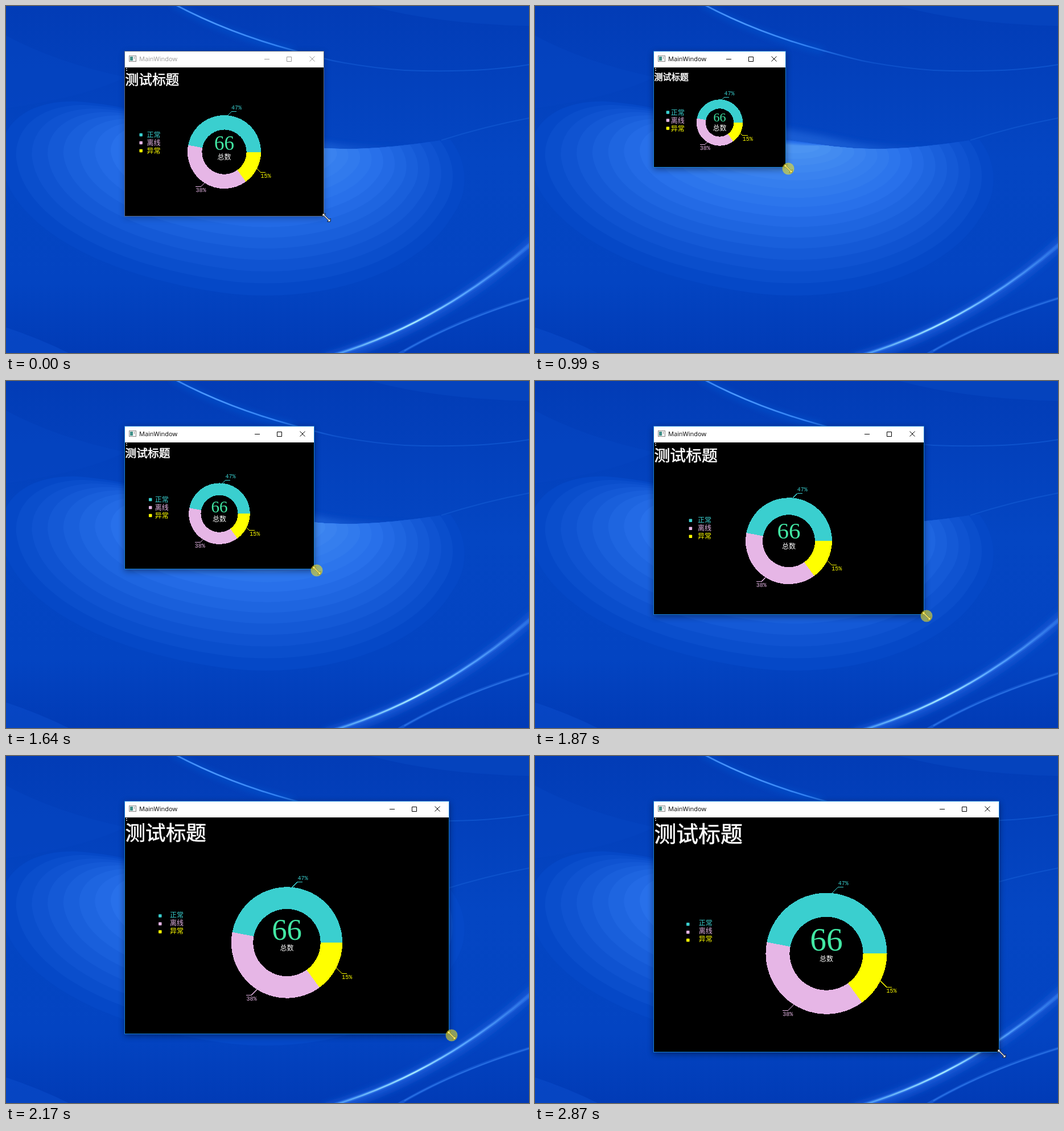
These frames come from a looping animation (919 px wide and 610 px high, 3.1 s). An HTML page:

```html
<!DOCTYPE html>
<html lang="zh">
<head>
<meta charset="utf-8">
<title>MainWindow</title>
<style>
html, body { margin: 0; width: 100%; height: 100%; overflow: hidden; background: #0341bb; }
svg { display: block; width: 100%; height: 100%; }
.caption { font: 11px "Open Sans", sans-serif; }
.label { font: 12px "Noto Sans CJK SC", "Noto Sans CJK", sans-serif; }
.percent { font: 10px "Liberation Mono", monospace; }
.total { font-family: "Liberation Serif", serif; }
.heading { font-family: "Noto Sans CJK SC", "Noto Sans CJK", sans-serif; }
.crisp { shape-rendering: crispEdges; }
</style>
</head>
<body>
<svg viewBox="0 0 919 610" preserveAspectRatio="none">
  <defs>
    <linearGradient id="base" x2="0" y2="1">
      <stop offset="0" stop-color="#023cb6"/>
      <stop offset=".45" stop-color="#0446c3"/>
      <stop offset=".8" stop-color="#0344c2"/>
      <stop offset="1" stop-color="#013bb6"/>
    </linearGradient>
    <linearGradient id="topRay" gradientUnits="userSpaceOnUse" x1="290" y1="0" x2="600" y2="0">
      <stop offset="0" stop-color="#347fee"/>
      <stop offset=".2" stop-color="#4c98ff"/>
      <stop offset=".6" stop-color="#3180f2"/>
      <stop offset="1" stop-color="#1257d2" stop-opacity="0"/>
    </linearGradient>
    <linearGradient id="lowRay" gradientUnits="userSpaceOnUse" x1="570" y1="0" x2="919" y2="0">
      <stop offset="0" stop-color="#3c8cf2"/>
      <stop offset=".42" stop-color="#a0e6ff"/>
      <stop offset=".65" stop-color="#5aa8ff"/>
      <stop offset="1" stop-color="#2a70e4"/>
    </linearGradient>
    <clipPath id="below">
      <path d="M-30 610V150H100C240 172 330 215 440 234S610 260 770 235H919V610Z"/>
    </clipPath>
    <filter id="soft" x="-20%" y="-30%" width="140%" height="160%"><feGaussianBlur stdDeviation="6"/></filter>
    <filter id="fine" x="-10%" y="-10%" width="120%" height="120%"><feGaussianBlur stdDeviation=".7"/></filter>
  </defs>

  <rect width="919" height="610" fill="url(#base)"/>
  <path d="M640 0Q760 32 919 35V0Z" fill="#0646c0" opacity=".7"/>
  <path d="M0 52Q90 100 210 125Q140 160 0 180Z" fill="#0545c1" opacity=".6"/>
  <path d="M0 565Q60 585 110 610H0Z" fill="#0a4cca" opacity=".6"/>
  <path d="M330 205Q440 212 540 236T750 245Q560 268 380 240Z" fill="#2a70e2" opacity=".55" filter="url(#soft)"/>
  <g id="glow" clip-path="url(#below)"></g>

  <g fill="none">
    <path d="M700 113Q830 118 919 103M765 236Q840 212 919 197" stroke="#0d52cc" stroke-width="2" filter="url(#fine)"/>
    <path d="M292 -4Q390 52 505 79" stroke="#1155d0" stroke-width="6" filter="url(#soft)"/>
    <path d="M505 78Q590 105 700 113" stroke="#0d50ca" stroke-width="2" filter="url(#fine)"/>
    <path d="M296 -3Q390 47 505 78T600 100" stroke="url(#topRay)" stroke-width="2.6" filter="url(#fine)"/>
    <path d="M560 622Q770 560 930 410" stroke="#1457d4" stroke-width="18" filter="url(#soft)"/>
    <path d="M575 614Q760 558 925 416" stroke="#2468e0" stroke-width="7" filter="url(#fine)"/>
    <path d="M575 614Q760 558 925 416" stroke="url(#lowRay)" stroke-width="3" filter="url(#fine)"/>
    <path d="M690 612Q790 552 925 512" stroke="#1254cf" stroke-width="5" filter="url(#fine)"/>
    <path d="M700 606Q795 552 925 512" stroke="#2c74e6" stroke-width="1.500" filter="url(#fine)"/>
  </g>

  <rect id="shadow" x="208" y="82" filter="url(#soft)"/>
  <rect id="body" x="208" y="79"/>
  <rect id="bar" x="209" y="80" height="28" fill="#fff"/>
  <rect id="edge" x="208.5" y="79.5" fill="none"/>
  <g>
    <rect x="216.500" y="87.500" width="12" height="10" fill="#f4f4f4" stroke="#8b8b8b"/>
    <rect x="218" y="89" width="5" height="7" fill="#3f8f88"/>
    <path d="M225.500 89v4" stroke="#999"/>
  </g>
  <text class="caption" id="caption" x="234" y="97">MainWindow</text>
  <path id="buttons" fill="none" d="M-104 93.500h9M-64.500 89.500h8v8h-8zM-24.500 88.500l9 9m0 -9l-9 9"/>
  <path d="M211 109h2v1.500h-2zM211 112.500h2v1.500h-2z" fill="#ddd"/>
  <text class="heading" id="heading" x="209.500" fill="#fff" stroke="#fff" stroke-width=".6">测试标题</text>
  <g id="chart"></g>
  <text class="total" id="total" text-anchor="middle" fill="#42e8a4">66</text>
  <text class="label" id="unit" text-anchor="middle" fill="#fff">总数</text>
  <g id="cursor">
    <path d="M-7-7L-1.500-7L-3.500-5L5 3.500L7 1.500V7H1.500L3.500 5L-5-3.500L-7-1.500Z" fill="#fff" stroke="#111"/>
    <circle id="press" r="10.500" fill="#ffeb14" opacity=".55"/>
  </g>
</svg>
<script>
const LOOP = 3100, ACTIVE = 760, RELEASE = 2870;
// Time in ms, right edge and bottom edge of the window while it is dragged.
const STEPS = [
  [0, 558, 369], [840, 525, 345], [920, 482, 313], [990, 440, 283],
  [1070, 424, 269], [1150, 414, 260], [1240, 408, 254], [1310, 407, 253],
  [1480, 436, 270], [1560, 488, 300], [1640, 541, 330], [1720, 594, 360],
  [1790, 641, 386], [1870, 683, 410], [1940, 720, 434], [2020, 741, 452],
  [2100, 761, 471], [2170, 778, 488], [2250, 791, 499], [2330, 801, 508],
  [2410, 808, 514], [2480, 811, 517], [2580, 815, 520]
];
const SLICES = [
  { name: '正常', share: 47, color: '#3acfcf', side: 1, up: -1 },
  { name: '离线', share: 38, color: '#e6b6e6', side: -1, up: 1 },
  { name: '异常', share: 15, color: '#ffff00', side: 1, up: 1 }
];

const $ = id => document.getElementById(id);

function set(el, attrs) {
  for (const key in attrs) el.setAttribute(key, attrs[key]);
  return el;
}

function add(parent, tag, attrs, text = '') {
  const el = document.createElementNS('http://www.w3.org/2000/svg', tag);
  el.textContent = text;
  return parent.appendChild(set(el, attrs));
}

function mix(a, b, k) {
  return `rgb(${a.map((v, i) => Math.round(v + (b[i] - v) * k))})`;
}

// Nested bands that flatten towards the bright middle.
function drawGlow() {
  const shape = 'M8 265C8 205 60 170 135 172C240 178 330 217 440 230S610 245 768 235' +
    'C800 275 800 325 770 365C715 455 560 508 400 492C210 470 20 390 8 265Z';
  const count = 16, cx = 460, cy = 246;
  const rim = [5, 72, 199], mid = [42, 115, 236], core = [76, 148, 242];
  for (let i = 0; i < count; i++) {
    const k = i / (count - 1), sx = 1.04 - k * 0.92, sy = sx ** 1.4;
    add($('glow'), 'path', {
      d: shape,
      fill: k < 0.5 ? mix(rim, mid, k / 0.5) : mix(mid, core, k * 2 - 1),
      transform: `translate(${cx * (1 - sx)} ${cy * (1 - sy)}) scale(${sx} ${sy})`
    });
  }
}

function buildChart() {
  for (const s of SLICES) {
    const fill = s.color;
    s.ring = add($('chart'), 'path', { fill, class: 'crisp' });
    s.lead = add($('chart'), 'path', { fill: 'none', stroke: fill, class: 'crisp' });
    s.percent = add($('chart'), 'text', { fill, class: 'percent' }, s.share + '%');
    s.mark = add($('chart'), 'rect', { fill, width: 5.5, height: 5.5, rx: 0.8 });
    s.label = add($('chart'), 'text', { fill, class: 'label' }, s.name);
  }
}

function drawChart(cx, cy, R) {
  const inner = R * 0.606;
  const at = (share, r) => {
    const a = share * Math.PI / 50;
    return [cx + r * Math.cos(a), cy - r * Math.sin(a)];
  };
  const legendY = cy - 1.5 - 0.547 * (R - 37);
  const legendX = cx - 2.1 * R;
  let from = 0;
  SLICES.forEach((s, i) => {
    const to = from + s.share;
    set(s.ring, {
      d: `M${at(from, R)}A${R} ${R} 0 0 0 ${at(to, R)}` +
         `L${at(to, inner)}A${inner} ${inner} 0 0 1 ${at(from, inner)}Z`
    });
    const [x, y] = at((from + to) / 2, R);
    const tilt = R * 0.1;
    const bx = x + s.side * tilt, by = y + s.up * tilt;
    set(s.lead, { d: `M${x} ${y}L${bx} ${by}h${s.side * 9}` });
    set(s.percent, { x: s.side > 0 ? bx : bx - 9, y: by + (s.up > 0 ? 9.5 : -3.5) });

    const row = legendY + (i - 1) * 14;
    set(s.mark, {
      x: legendX - 5 - 0.2086 * (R - 37) - 2.75,
      y: row - 3.5 + 0.04 * (R - 37)
    });
    set(s.label, { x: legendX - 0.5, y: row + 4.5 });
    from = to;
  });
  set($('total'), { x: cx, y: cy - 0.05 * R, 'font-size': 0.54 * R });
  set($('unit'), { x: cx, y: cy + 13.5 });
}

function render(t) {
  const [, right, bottom] = STEPS.findLast(s => s[0] <= t);
  const active = t >= ACTIVE;
  const width = right - 207, height = bottom - 78;
  const ink = active ? '#000' : '#999';

  set($('shadow'), { width, height, opacity: active ? 0.42 : 0.25 });
  set($('body'), { width, height });
  set($('bar'), { width: width - 2 });
  set($('edge'), { width: width - 1, height: height - 1, stroke: active ? '#1883d7' : '#5c6b80' });
  set($('caption'), { fill: ink });
  set($('buttons'), { stroke: ink, transform: `translate(${right} 0)` });

  const h = bottom - 108;
  const size = 0.1 * h - 2.4;
  set($('heading'), { y: 117 + 0.88 * size, 'font-size': size });
  drawChart((209 + right) / 2, 100 + 0.6 * h, 0.278 * h - 8);

  set($('cursor'), { transform: `translate(${right + 5} ${bottom + 3})` });
  set($('press'), { visibility: active && t < RELEASE ? 'visible' : 'hidden' });
}

drawGlow();
buildChart();
const start = performance.now();
function tick() {
  render((performance.now() - start) % LOOP);
  requestAnimationFrame(tick);
}
tick();
</script>
</body>
</html>
```
